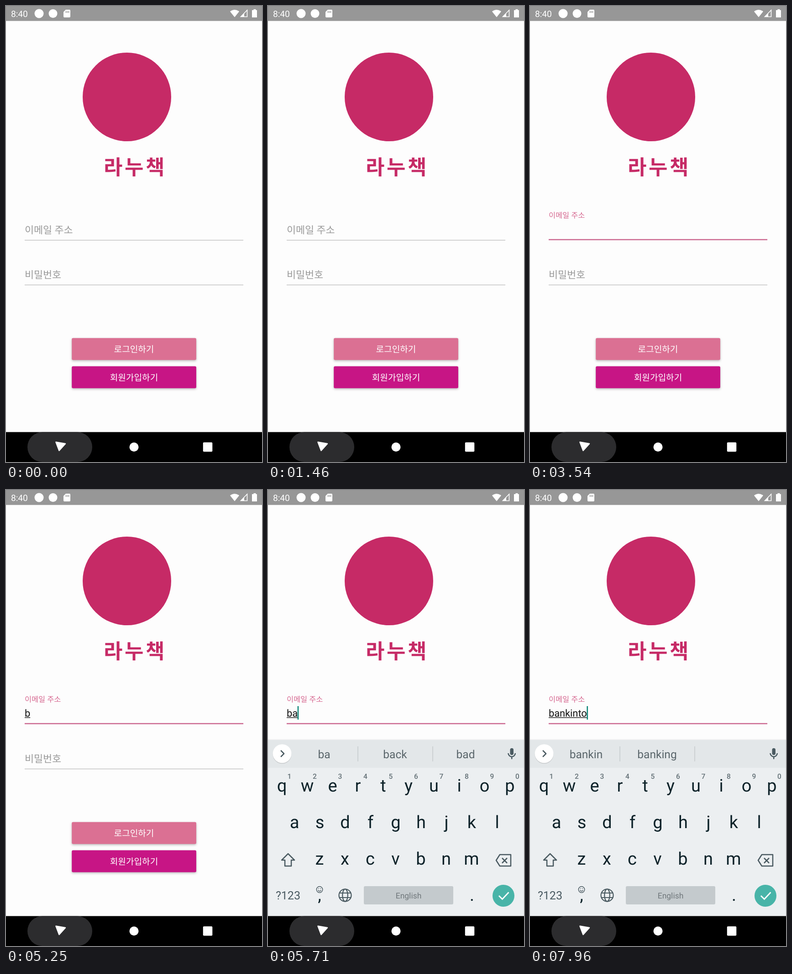
These frames come from a looping animation (561 by 998 pixels, 8 s). An HTML page:

```html
<!DOCTYPE html>
<html lang="ko">
<head>
<meta charset="utf-8">
<style>
  html, body { margin: 0; width: 100%; height: 100%; overflow: hidden; background: #fdfdfd; }
  svg { display: block; width: 100vw; height: 100vh; }
  text { font-family: Roboto, "Noto Sans CJK KR", "Noto Sans CJK", sans-serif; text-rendering: geometricPrecision; }
  .mid { text-anchor: middle; }
  .button { filter: drop-shadow(0 2.5px 2.5px #0004); }
  .icon { fill: none; stroke: #4a5a61; stroke-width: 2.5; stroke-linejoin: round; }
</style>
</head>
<body>
<svg viewBox="0 0 561 998" preserveAspectRatio="none">
  <rect width="561" height="998" fill="#fdfdfd"/>

  <circle cx="265" cy="199" r="97" fill="#c62a66"/>
  <text x="214" y="369" font-size="45" font-weight="700" letter-spacing="4.6" fill="#c62a66">라누책</text>

  <text id="label" x="40.9">이메일 주소</text>
  <rect id="line" x="40.9" width="479.2"/>
  <text id="typed" x="40.9" y="496" font-size="21.8" fill="#111"></text>
  <rect id="underline" x="40.9" y="497.5" height="1.4" fill="#111"/>
  <rect id="caret" y="473" width="2.6" height="29.5" fill="#12897b"/>

  <text x="40.9" y="596" font-size="21.8" fill="#999">비밀번호</text>
  <rect x="40.9" y="610" width="479.2" height="1" fill="#aaa"/>

  <rect class="button" x="144.2" y="726.7" width="272.7" height="48" rx="2.7" fill="#db7093"/>
  <text class="mid" x="280.5" y="758" font-size="19.1" fill="#fff">로그인하기</text>
  <rect class="button" x="144.2" y="788.5" width="272.7" height="48" rx="2.7" fill="#c71585"/>
  <text class="mid" x="280.5" y="820" font-size="19.1" fill="#fff">회원가입하기</text>

  <g id="keyboard">
    <rect y="545" width="561" height="3" fill="#000" opacity=".04"/>
    <rect y="547" width="561" height="386" fill="#eceff1"/>
    <rect y="547" width="561" height="61" fill="#e3e7e9"/>
    <circle cx="31" cy="578.5" r="20.5" fill="#0002"/>
    <circle cx="31" cy="577" r="20.5" fill="#fff"/>
    <path class="icon" d="M28 570l7 7-7 7"/>
    <path d="M197 561v33M361 561v33" stroke="#c5cacc" stroke-width="1.5"/>
    <g id="suggestions" class="mid" font-size="24.5" fill="#5a666b"></g>
    <rect x="530.5" y="565" width="7.5" height="15" rx="3.75" fill="#4a5a61"/>
    <path class="icon" d="M526.5 576a7.7 7.7 0 0 0 15.4 0M534.2 584v5"/>

    <g id="keys" class="mid"></g>

    <path class="icon" d="M44 796l14 14h-7v13h-14v-13h-7z"/>
    <path class="icon" d="M508 798h24v25h-24l-8-12.5zM513 805.5l11 11m0-11l-11 11"/>
    <text x="17" y="896" font-size="25" fill="#4a5a61">?123</text>
    <g class="icon" style="stroke-width:1.5">
      <circle cx="113" cy="874.5" r="6.7"/>
      <path d="M109.5 876q3.5 4 7 0M110 872.5h1.6M114.5 872.5h1.6"/>
    </g>
    <g class="icon" style="stroke-width:2.2">
      <circle cx="169" cy="887" r="13.5"/>
      <ellipse cx="169" cy="887" rx="5.8" ry="13.5"/>
      <path d="M156.5 882h25M156.5 892h25"/>
    </g>
    <rect x="210" y="867" width="196" height="40" rx="3" fill="#c4cacd"/>
    <text class="mid" x="308" y="893.5" font-size="17.5" fill="#70777b">English</text>
    <circle cx="516" cy="888" r="24" fill="#48b4a8"/>
    <path d="M506 888l7.5 7.5 14-15" fill="none" stroke="#fff" stroke-width="2.8"/>
  </g>

  <rect width="561" height="32.7" fill="#979797"/>
  <g fill="#fff">
    <text x="11" y="23.5" font-size="19.1">8:40</text>
    <circle cx="72.5" cy="16.5" r="10"/>
    <circle cx="103" cy="16.5" r="9.5"/>
    <path d="M131 8h8q2 0 2 2v13q0 2-2 2h-11q-2 0-2-2v-10z"/>
    <path d="M131.5 11v4M134.5 11v4M137.5 11v4" stroke="#979797" stroke-width="1.5"/>
    <path d="M491 12q10-7.5 20 0l-10 12.5z"/>
    <path d="M528.5 9v14.5h-14z" fill="none" stroke="#fff" stroke-width="1.6"/>
    <path d="M522 16v8h-8z"/>
    <path d="M542.5 7h5v2h2.5v16h-11v-16h3.5z"/>
  </g>

  <rect y="932.5" width="561" height="65.5"/>
  <rect x="47" y="932.5" width="142" height="65.5" rx="32.7" fill="#2c2c2e"/>
  <g fill="#fff">
    <path d="M109.5 954.5l20.5 3.5-13.5 15z" stroke="#fff" stroke-width="2.5" stroke-linejoin="round"/>
    <circle cx="280.5" cy="965.3" r="10"/>
    <rect x="431.8" y="955" width="20.5" height="20.5" rx="2"/>
  </g>
</svg>
<script>
const LOOP = 8000, FOCUS = 2580, KEYBOARD = 5300;
const word = 'bankinto';
const typeTimes = [4800, 5500, 6050, 6380, 6700, 7020, 7350, 7680];
const suggestionSets = {
  2: ['ba', 'back', 'bad'],
  3: ['ban', 'band', 'bank'],
  4: ['bank', 'banks', 'banked'],
  5: ['banki', 'banking', 'bank'],
  6: ['bankin', 'banking', ''],
};

const $ = id => document.getElementById(id);
const set = (el, attrs) => { for (const k in attrs) el.setAttribute(k, attrs[k]); };
const mix = (a, b, p) => a + (b - a) * p;
const mixColor = (a, b, p) => `rgb(${a.map((v, i) => Math.round(mix(v, b[i], p)))})`;
const easeOut = (t, start, span) => 1 - (1 - Math.min(1, Math.max(0, (t - start) / span))) ** 3;

function addText(parent, x, y, content, attrs = {}) {
  const el = document.createElementNS('http://www.w3.org/2000/svg', 'text');
  set(el, { x, y, ...attrs });
  el.textContent = content;
  parent.append(el);
  return el;
}

const keyStyle = { 'font-size': 38, fill: '#0d2229' };
const hintStyle = { 'font-size': 15.5, 'font-weight': 500, fill: '#647177' };

function addRow(letters, left, y, style = keyStyle) {
  [...letters].forEach((c, i) => addText($('keys'), left + 55.5 * i, y, c, style));
}
addRow('qwertyuiop', 30.5, 660);
addRow('asdfghjkl', 58, 740);
addRow('zxcvbnm', 113, 820);
addRow('1234567890', 47, 632, hintStyle);
addText($('keys'), 113, 899, ',', keyStyle);
addText($('keys'), 447, 899, '.', keyStyle);

const slots = [123, 278.5, 433].map(x => addText($('suggestions'), x, 586.5, ''));

function render(t) {
  const focus = easeOut(t, FOCUS, 200);
  set($('label'), {
    y: mix(498, 464, focus),
    'font-size': mix(21.8, 16.4, focus),
    fill: mixColor([153, 153, 153], [214, 104, 144], focus),
  });
  set($('line'), {
    y: mix(512, 510, focus),
    height: mix(1, 2.6, focus),
    fill: mixColor([170, 170, 170], [206, 112, 150], focus),
  });

  const count = typeTimes.filter(at => t >= at).length;
  $('typed').textContent = word.slice(0, count);
  const width = count ? $('typed').getComputedTextLength() : 0;
  set($('underline'), { width });

  const sinceKey = t - (typeTimes[count - 1] ?? 0);
  const caretOn = t >= KEYBOARD && sinceKey % 1000 < 500;
  set($('caret'), { x: 40.5 + width, visibility: caretOn ? 'visible' : 'hidden' });

  const words = suggestionSets[Math.min(6, Math.max(2, count))];
  slots.forEach((slot, i) => slot.textContent = words[i]);

  const rise = easeOut(t, KEYBOARD, 240);
  set($('keyboard'), {
    transform: `translate(0 ${390 * (1 - rise)})`,
    visibility: t >= KEYBOARD ? 'visible' : 'hidden',
  });
}

function tick() {
  render(performance.now() % LOOP);
  requestAnimationFrame(tick);
}
tick();
</script>
</body>
</html>
```
